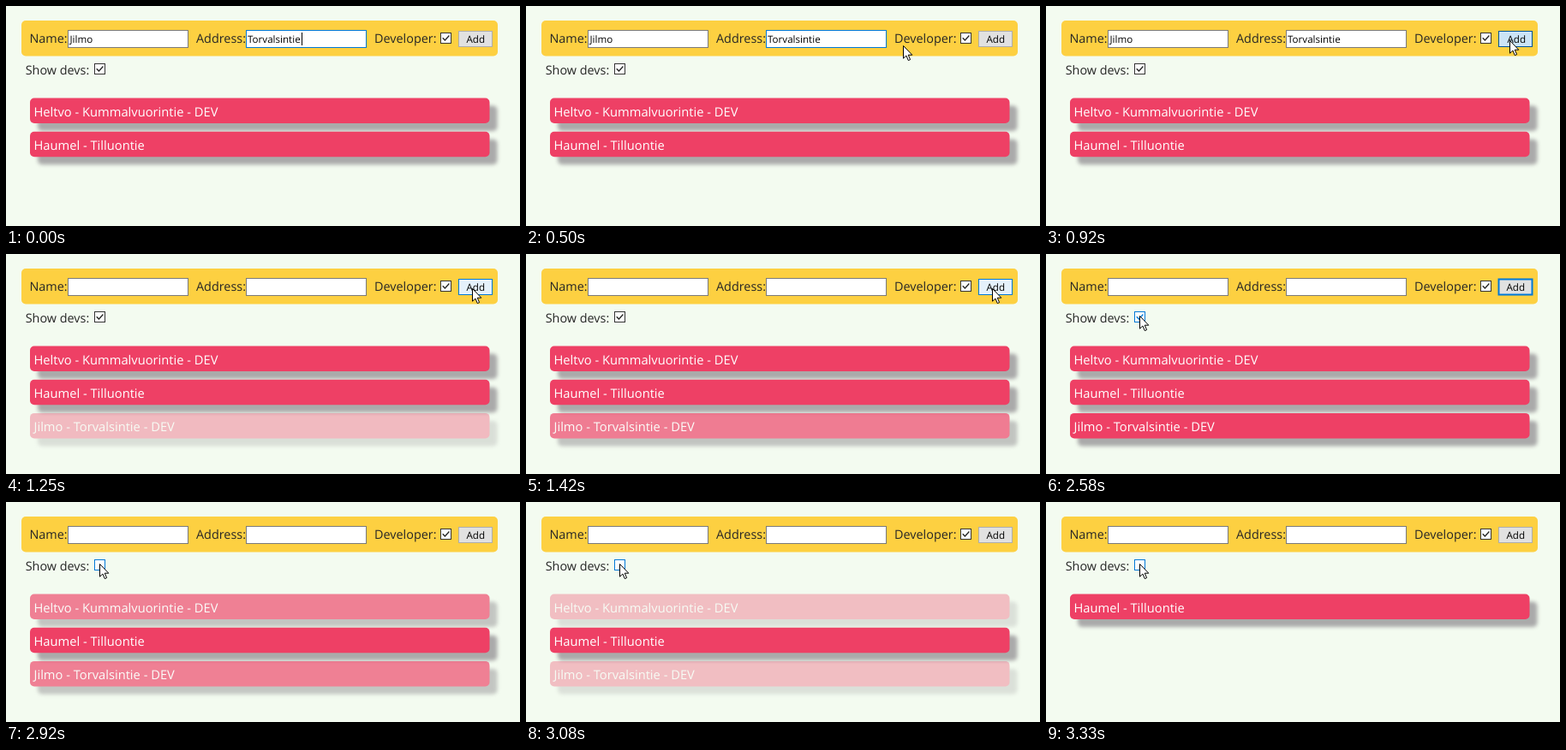
Recreate the animation shown at these times as an HTML page. Size 600x257 px, loop 4080 ms.

```html
<!DOCTYPE html>
<html lang="en">
<head>
<meta charset="utf-8">
<title>Add and filter a list</title>
<style>
  html, body { margin: 0; width: 100%; height: 100%; overflow: hidden; background: #f3fbf0; }
  svg { display: block; width: 600px; height: 257px; }
  text { font: 14.4px "Open Sans", "Noto Sans", sans-serif; fill: #262626; text-rendering: geometricPrecision; }
  .small { font-size: 11.6px; fill: #000; }
  .card { filter: drop-shadow(9.6px 9.6px 2.3px #aaa); }
  .card rect { fill: #ee4065; }
  .card text { font-size: 14.7px; fill: #fff; }
  .box { fill: #fff; stroke: #7a7a7a; }
  .check { fill: #fff; stroke: #333; }
  .tick { fill: none; stroke: #222; stroke-width: 1.3; }
</style>
</head>
<body>
<svg viewBox="0 0 600 257">
  <rect x="18" y="17" width="556" height="41.5" rx="5" fill="#fdd041"/>
  <text x="27.5" y="43">Name:</text>
  <text x="222" y="43">Address:</text>
  <text x="430" y="43">Developer:</text>
  <text x="22.7" y="79.5">Show devs:</text>

  <rect id="name" class="box" x="72.5" y="28.5" width="140" height="20"/>
  <rect id="address" class="box" x="280.5" y="28.5" width="140" height="20"/>
  <g id="typed">
    <text class="small" x="74.5" y="42.5">Jilmo</text>
    <text class="small" x="282" y="42.5">Torvalsintie</text>
  </g>
  <path id="caret" d="M345.5 31V46" stroke="#000"/>

  <rect class="check" x="507.5" y="31.5" width="12" height="12"/>
  <path class="tick" d="M509.7 37.3l2.7 2.7l5-5.5"/>
  <rect id="filter" class="check" x="103.5" y="67.5" width="12" height="12"/>
  <path id="tick" class="tick" d="M105.7 73.3l2.7 2.7l5-5.5"/>

  <rect id="button" x="528.5" y="29.5" width="39" height="18"/>
  <text id="add" class="small" y="42.5">Add</text>

  <g id="cards"></g>

  <g id="pointer">
    <path id="arrow" d="M.5 .5V15.2L3.9 12L6.3 17.6L8.6 16.6L6.2 11.2H10.8Z" fill="#fff" stroke="#000"/>
    <path id="beam" d="M-3 -8H-1L0 -7L1 -8H3M0 -7V7M-3 8H-1L0 7L1 8H3" fill="none" stroke="#000"/>
  </g>
</svg>
<script>
const LOOP = 4080, FPS = 12;
const PRESS = 910, RELEASE = 1080, UNCHECK = 2745, REMOVED = 3245, FADE = 500;
const BLUE = '#0078d7';
const $ = id => document.getElementById(id);

// Pointer route: time, x, y
const route = [
  [250, 417, 42], [333, 417, 42], [500, 440, 46], [833, 538, 41], [917, 541, 40],
  [1333, 545, 40], [1500, 543, 40], [1750, 330, 44], [1917, 155, 45],
  [2000, 133, 53], [2250, 111, 71], [2417, 109, 72]
];

const cards = [
  ['Heltvo - Kummalvuorintie - DEV', true],
  ['Haumel - Tilluontie', false],
  ['Jilmo - Torvalsintie - DEV', true]
].map(([label, dev], row) => {
  $('cards').insertAdjacentHTML('beforeend',
    `<g class="card"><rect x="28" y="107.5" width="536.5" height="29.5" rx="5"/>
     <text x="32.5" y="128.5">${label}</text></g>`);
  return { el: $('cards').lastElementChild, dev, row };
});

const clamp = v => Math.max(0, Math.min(1, v));
const set = (el, attrs) => { for (const k in attrs) el.setAttribute(k, attrs[k]); };
const show = (id, on) => { $(id).style.display = on ? '' : 'none'; };
const over = (id, [x, y]) => {
  const b = $(id).getBBox();
  return x >= b.x && x <= b.x + b.width && y >= b.y && y <= b.y + b.height;
};

function pointerAt(t) {
  const i = route.findIndex(p => p[0] > t);
  if (i === 0) return route[0].slice(1);
  if (i < 0) return route[route.length - 1].slice(1);
  const [t0, x0, y0] = route[i - 1], [t1, x1, y1] = route[i];
  const u = (t - t0) / (t1 - t0);
  return [x0 + (x1 - x0) * u, y0 + (y1 - y0) * u];
}

function drawButton(t, hover) {
  const pressed = t >= PRESS && t < RELEASE;
  const focused = t >= RELEASE && t < UNCHECK;
  const [fill, stroke] = pressed ? ['#cce4f7', '#005499']
    : hover ? ['#e5f1fb', BLUE]
    : ['#e1e1e1', focused ? BLUE : '#adadad'];
  set($('button'), { fill, stroke, 'stroke-width': focused && !hover ? 2 : 1 });
  set($('add'), { x: pressed ? 538.5 : 537.5 });
}

function drawCards(t) {
  for (const { el, dev, row } of cards) {
    const fadeIn = row === 2 ? clamp((t - RELEASE) / FADE) : 1;
    const fadeOut = dev ? clamp(1 - (t - UNCHECK) / FADE) : 1;
    const alpha = t >= REMOVED && dev ? 0 : fadeIn * fadeOut;
    el.style.display = alpha ? '' : 'none';
    el.style.opacity = alpha;
    set(el, { transform: `translate(0 ${t >= REMOVED ? 0 : row * 39.2})` });
  }
}

function draw(time) {
  const t = Math.floor((time + 5) * FPS / 1000) * 1000 / FPS;
  const pos = pointerAt(t), last = pointerAt(t - 80);
  const inField = over('name', pos) || over('address', pos);

  show('caret', t < 245);
  show('typed', t < RELEASE);
  show('pointer', t >= 245);
  show('arrow', !inField);
  show('beam', inField);
  set($('pointer'), { transform: `translate(${pos.map(Math.round)})` });

  // Field outlines react one step after the pointer
  for (const id of ['name', 'address']) {
    const focused = id === 'address' && t < PRESS;
    $(id).style.stroke = focused ? BLUE : t > 1000 && over(id, last) ? '#171717' : '';
  }
  const onFilter = over('filter', pos);
  $('filter').style.stroke = $('tick').style.stroke = onFilter ? BLUE : '';
  show('tick', t < UNCHECK);

  drawButton(t, over('button', pos));
  drawCards(t);
}

const start = performance.now();
function tick() {
  draw((performance.now() - start) % LOOP);
  requestAnimationFrame(tick);
}
tick();
</script>
</body>
</html>
```
